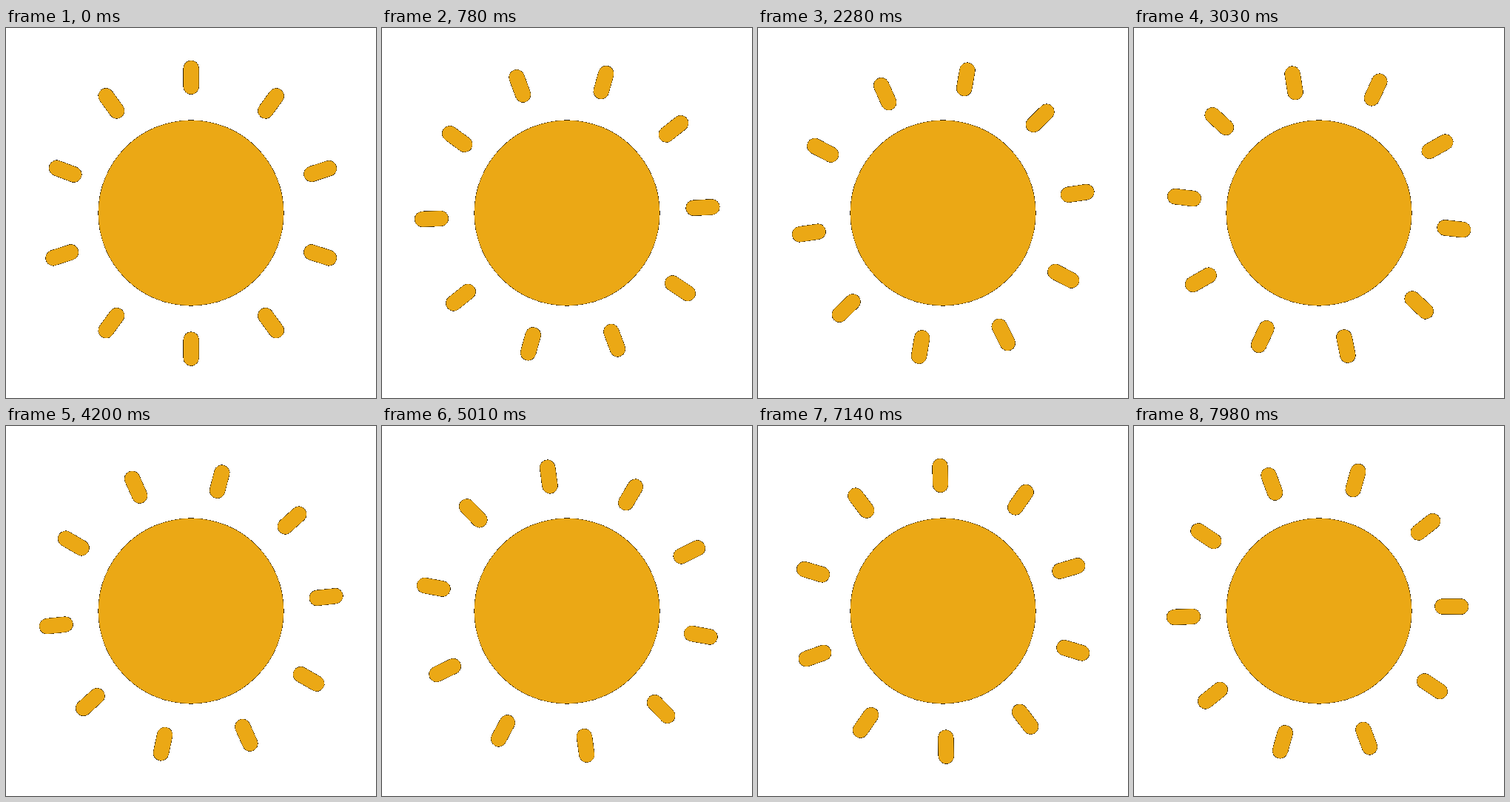
These frames come from a looping animation (500 by 500 pixels, 8 s). An HTML page with a canvas:

```html
<!DOCTYPE html>
<html lang="en">
<head>
<meta charset="utf-8">
<title>Turning sun</title>
<style>
  html, body { margin: 0; width: 100%; height: 100%; overflow: hidden; background: #fff; }
  canvas { display: block; width: 500px; height: 500px; }
</style>
</head>
<body>
<canvas id="stage" width="500" height="500"></canvas>
<script>
const SIZE = 500;
const LOOP = 8000;
const STEP = 30;
const DEG_PER_MS = 0.02;
const SUN_RADIUS = 125.25;
const RAY_COUNT = 10;
const RAY_DISTANCE = 183.4;
const RAY_WIDTH = 20.8;
const RAY_HALF = 12.4;
const RAY_OFFSET = 0.2;
const ODD_RAY = 8;

const ctx = document.getElementById('stage').getContext('2d', { willReadFrequently: true });
const rad = degrees => degrees * Math.PI / 180;

function drawRay(x, y, degrees) {
  const dx = RAY_HALF * Math.cos(rad(degrees));
  const dy = RAY_HALF * Math.sin(rad(degrees));
  ctx.beginPath();
  ctx.moveTo(x - dx, y - dy);
  ctx.lineTo(x + dx, y + dy);
  ctx.stroke();
}

function drawRays() {
  for (let i = 0; i < RAY_COUNT; i++) {
    if (i === ODD_RAY) {
      drawRay(-170, -56.6, 20.5); // sits a little closer and more tilted
      continue;
    }
    const angle = i * 360 / RAY_COUNT - 90;
    drawRay(RAY_DISTANCE * Math.cos(rad(angle)), RAY_DISTANCE * Math.sin(rad(angle)), angle);
  }
}

// Blend partly covered edge pixels with black, giving a hairline outline.
function darkenEdges() {
  const image = ctx.getImageData(0, 0, SIZE, SIZE);
  const px = image.data;
  for (let i = 0; i < px.length; i += 4) {
    const alpha = px[i + 3];
    if (alpha === 255) continue;
    for (let c = 0; c < 3; c++) px[i + c] *= alpha / 255;
    px[i + 3] = alpha > 24 ? 255 : 0;
  }
  ctx.putImageData(image, 0, 0);
}

function draw(time) {
  ctx.clearRect(0, 0, SIZE, SIZE);
  ctx.save();
  ctx.translate(SIZE / 2, SIZE / 2);
  ctx.fillStyle = ctx.strokeStyle = '#eba815';
  ctx.lineWidth = RAY_WIDTH;
  ctx.lineCap = 'round';
  ctx.beginPath();
  ctx.arc(0, 0, SUN_RADIUS, 0, 2 * Math.PI);
  ctx.fill();
  ctx.translate(RAY_OFFSET, RAY_OFFSET);
  ctx.rotate(rad(time * DEG_PER_MS));
  drawRays();
  ctx.restore();
  darkenEdges();
}

let start, shown;
function tick() {
  const now = performance.now();
  start ??= now;
  const time = Math.floor((now - start) % LOOP / STEP) * STEP;
  if (time !== shown) draw(shown = time);
  requestAnimationFrame(tick);
}
tick();
</script>
</body>
</html>
```
